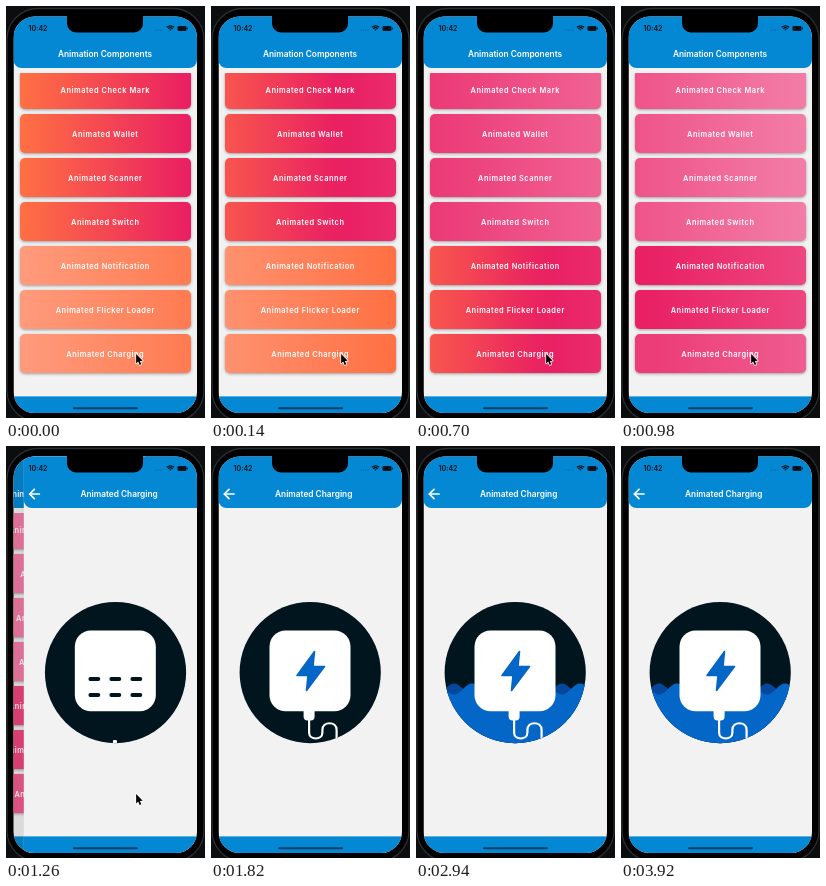
Animation, 199 px wide and 412 px high, one loop 4.06 s. Source, as an HTML page with a canvas:

```html
<!DOCTYPE html>
<html lang="en">
<head>
<meta charset="utf-8">
<title>Animation Components</title>
<style>
  html, body { margin: 0; height: 100%; overflow: hidden; background: #000; }
  canvas { display: block; width: 199px; height: 412px; }
</style>
</head>
<body>
<canvas id="stage"></canvas>
<script>
const W = 199, H = 412, LOOP = 4060, STEP = 140;
const BLUE = '#0488d3', PAPER = '#f2f2f2', NIGHT = '#00151d', WATER = '#0466c6';
const LABELS = ['Check Mark', 'Wallet', 'Scanner', 'Switch', 'Notification', 'Flicker Loader', 'Charging'];
// Colour ramp that slides through the buttons; positions are in button widths.
const RAMP = [[-1.5, [255, 161, 132]], [0, [255, 112, 67]], [1, [233, 30, 99]], [4, [246, 154, 187]]];

const canvas = document.getElementById('stage');
const ctx = canvas.getContext('2d');
const dpr = window.devicePixelRatio || 1;
canvas.width = W * dpr;
canvas.height = H * dpr;

const clamp = v => Math.min(1, Math.max(0, v));
const progress = (t, start, length) => clamp((t - start) / length);
const easeOut = (v, power = 3) => 1 - (1 - v) ** power;

function box(x, y, w, h, r, fill) {
  ctx.beginPath();
  ctx.roundRect(x, y, w, h, r);
  if (fill) { ctx.fillStyle = fill; ctx.fill(); }
}

function text(str, x, y, size, spacing = 0, fill = '#fff') {
  ctx.font = `600 ${size}px Inter, sans-serif`;
  ctx.letterSpacing = spacing + 'px';
  ctx.textAlign = 'center';
  ctx.textBaseline = 'alphabetic';
  ctx.fillStyle = fill;
  ctx.fillText(str, x + spacing / 2, y);
}

function line(points, width, color, close) {
  ctx.beginPath();
  points.forEach(([x, y]) => ctx.lineTo(x, y));
  if (close) ctx.closePath();
  ctx.lineWidth = width;
  ctx.strokeStyle = color;
  ctx.lineCap = ctx.lineJoin = 'round';
  ctx.stroke();
}

function layer(draw) {
  ctx.save();
  draw();
  ctx.restore();
}

function rampColor(u) {
  let i = 0;
  while (i < RAMP.length - 2 && u > RAMP[i + 1][0]) i++;
  const [a, from] = RAMP[i], [b, to] = RAMP[i + 1];
  const k = clamp((u - a) / (b - a));
  return `rgb(${from.map((c, j) => Math.round(c + (to[j] - c) * k))})`;
}

function pageFrame(title, titleX) {
  ctx.fillStyle = PAPER;
  ctx.fillRect(7.5, 10, 183.5, 398);
  box(7.5, 0, 183.5, 62, [0, 0, 8, 8], BLUE);
  ctx.fillStyle = BLUE;
  ctx.fillRect(7.5, 390.4, 183.5, 20);
  text(title, titleX, 51, 8.3);
}

function listPage(t) {
  pageFrame('Animation Components', 99);
  ctx.beginPath();
  ctx.rect(8, 67, 183, 323);
  ctx.clip();
  LABELS.forEach((label, i) => {
    const y = 64 + i * 44;
    const u = t / 425 - (i < 4 ? 0 : 1.33);
    const fill = ctx.createLinearGradient(14, 0, 185, 0);
    for (let k = 0; k <= 8; k++) fill.addColorStop(k / 8, rampColor(u + k / 8));
    layer(() => {
      ctx.shadowColor = 'rgba(0,0,0,.35)';
      ctx.shadowBlur = 3 * dpr;
      ctx.shadowOffsetY = dpr;
      box(14, y, 171, 39, 5, fill);
    });
    if (i === 6 && t >= 980) box(14, y, 171, 39, 5, 'rgba(255,255,255,.12)');
    text('Animated ' + label, 99, y + 22.6, 7.4, 0.54);
  });
}

function wave(level, crest, fill) {
  ctx.beginPath();
  ctx.moveTo(26, 300);
  for (let x = 26; x <= 172; x++)
    ctx.lineTo(x, level - 5.5 * Math.cos((x - crest) / 36 * 2 * Math.PI));
  ctx.lineTo(172, 300);
  ctx.fillStyle = fill;
  ctx.fill();
}

function plug(drop) {
  ctx.translate(-0.4, drop);
  box(97, 260, 4, 8, 1, '#fff');
  box(93, 264, 11, 10.5, [0, 0, 4, 4], '#fff');
  ctx.beginPath();
  ctx.moveTo(98.5, 273);
  ctx.lineTo(98.5, 286.5);
  ctx.bezierCurveTo(98.5, 294.5, 111.8, 294.5, 111.8, 286.5);
  ctx.lineTo(111.8, 284);
  ctx.bezierCurveTo(111.8, 275, 126, 275, 126, 284);
  ctx.lineTo(126, 300);
  ctx.lineWidth = 2.2;
  ctx.strokeStyle = '#fff';
  ctx.stroke();
}

function chargingPage(t) {
  pageFrame('Animated Charging', 102.7);
  line([[23, 48], [13.5, 48]], 1.7, '#fff');
  line([[18, 43.3], [13.3, 48], [18, 52.7]], 1.7, '#fff');

  const fill = easeOut(progress(t, 1820, 980));
  const drop = 34 * (1 - easeOut(progress(t, 1260, 420)));
  const dashes = 1 - progress(t, 1400, 280);
  const bolt = easeOut(progress(t, 1540, 280));
  const drift = 108 * (1 - fill);

  ctx.beginPath();
  ctx.arc(99.2, 226.6, 70.6, 0, 2 * Math.PI);
  ctx.fillStyle = NIGHT;
  ctx.fill();
  layer(() => {
    ctx.clip();
    const level = 305 - 62 * fill;
    wave(level, 38 + drift, '#04479b');
    wave(level, 56 - drift, WATER);
    layer(() => plug(drop));
  });
  box(58.5, 184.5, 81, 80.7, 16, '#fff');

  layer(() => {
    ctx.globalAlpha = dashes;
    for (const y of [233, 249])
      for (const x of [74, 95, 116]) line([[x, y], [x + 8, y]], 3.8, NIGHT);
  });
  if (bolt > 0) layer(() => {
    ctx.translate(99.5, 225);
    ctx.scale(bolt, bolt);
    const shape = [[4, -19.5], [-13.5, 4.5], [-2.5, 4.5], [-4, 19.5], [14, -4.5], [2.5, -4.5]];
    line(shape, 1.6, WATER, true);
    ctx.fillStyle = WATER;
    ctx.fill();
  });
}

function statusBar() {
  const ink = '#03131d';
  text('10:42', 32, 25, 7.1, 0, ink);
  for (let i = 0; i < 4; i++) box(149.5 + i * 2.3, 23.5, 1.1, 1.1, 0.5, 'rgba(0,30,50,.5)');
  [1.2, 3.2, 5.2].forEach(r => {
    ctx.beginPath();
    ctx.arc(164.5, 25, r, -Math.PI * 0.75, -Math.PI * 0.25);
    ctx.lineWidth = 1.3;
    ctx.lineCap = 'butt';
    ctx.strokeStyle = ink;
    ctx.stroke();
  });
  box(171.5, 20, 9, 5, 1.3, ink);
  box(181, 21.5, 0.9, 2, 0.4, ink);
}

function cursor() {
  ctx.translate(129.6, 347.5);
  ctx.scale(1.08, 1.08);
  const arrow = [[0.5, 0.5], [0.5, 9.2], [2.4, 7.5], [3.8, 10.6], [5.3, 9.9], [3.9, 7], [6.6, 6.8]];
  line(arrow, 1.4, '#fff', true);
  ctx.fillStyle = '#000';
  ctx.fill();
}

function draw(t) {
  ctx.setTransform(dpr, 0, 0, dpr, 0, 0);
  ctx.fillStyle = '#0b0d0e';
  ctx.fillRect(0, 0, W, H);
  box(1, 2.5, 197, 413, 31, '#000');
  ctx.lineWidth = 1.3;
  ctx.strokeStyle = '#2a2e30';
  ctx.stroke();

  layer(() => {
    box(7.5, 10.6, 183.5, 396.4, 21);
    ctx.clip();
    const push = easeOut(progress(t, 985, 500), 3.6);
    if (push < 1) layer(() => {
      ctx.translate(-55 * push, 0);
      listPage(t);
    });
    if (push > 0) {
      ctx.fillStyle = `rgba(0,0,0,${0.1 * push})`;
      ctx.fillRect(7, 10, 184, 398);
      layer(() => {
        ctx.translate(183 * (1 - push), 0);
        chargingPage(t);
      });
    }
    statusBar();
    box(67, 401.2, 65, 2, 1, '#063f63');
  });
  box(61, 8, 76, 18.5, [0, 0, 9, 9], '#000');
  if (t < 1540) layer(cursor);
}

function tick() {
  const t = performance.now() % LOOP;
  draw(Math.floor(t / STEP) * STEP);
  requestAnimationFrame(tick);
}
tick();
</script>
</body>
</html>
```
